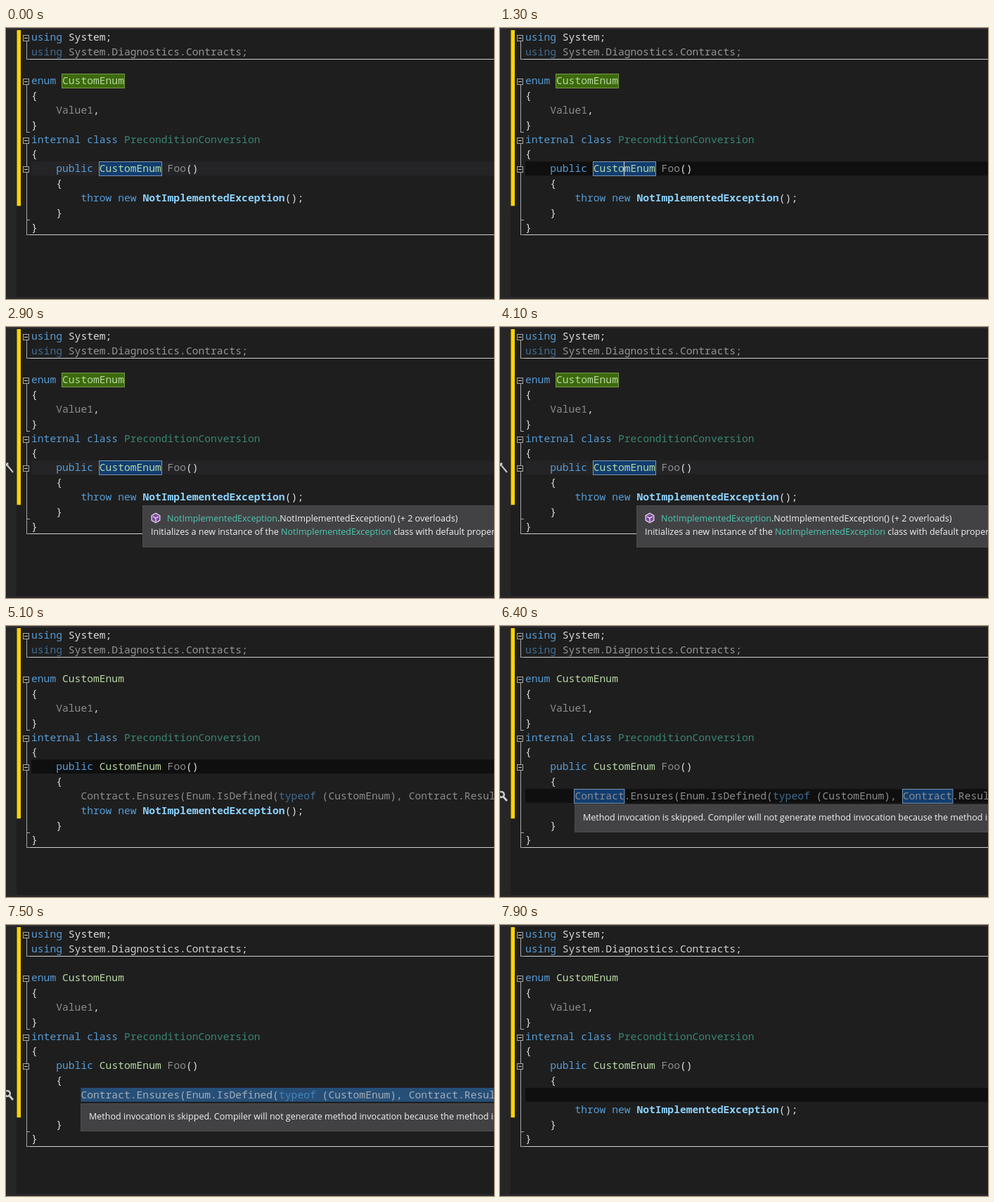
These frames come from a looping animation (694 px wide and 386 px high, 8 s). An HTML page with a canvas:

```html
<!DOCTYPE html>
<html lang="en">
<head>
<meta charset="utf-8">
<title>Code editor</title>
<style>
html, body { margin: 0; width: 100%; height: 100%; overflow: hidden; background: #1e1e1e; }
canvas { display: block; width: 694px; height: 386px; }
</style>
</head>
<body>
<canvas id="stage" width="694" height="386"></canvas>
<script>
const W = 694, H = 386, LOOP = 8000;
const ctx = document.getElementById('stage').getContext('2d');

const LEFT = 36, TOP = 2.8, PITCH = 20.83, CHAR = 8.8;
const CODE = '14.667px "Noto Sans Mono", "DejaVu Sans Mono", monospace';
const TIP = '12.55px "Open Sans", "Noto Sans", sans-serif';

const C = {
  bg: '#1e1e1e', plain: '#dcdcdc', key: '#569cd6', dimKey: '#416c91',
  gray: '#8c8c8c', type: '#b8d7a3', cls: '#3a8573', call: '#8cd2fc',
  fold: '#a8a8a8', rule: '#cfcfcf', yellow: '#fbd304', tip: '#424245',
  tipEdge: '#4b4b4e', tipText: '#f1f1f1', tipType: '#4ec9b0'
};

const rowY = row => TOP + row * PITCH;
const colX = col => LEFT + col * CHAR;
const within = (t, from, to) => t >= from && t < to;

function fill(x, y, w, h, color) {
  ctx.fillStyle = color;
  ctx.fillRect(x, y, w, h);
}

// Runs are [text, color, bold] triples laid out on the character grid.
function codeLine(row, col, ...runs) {
  for (const [text, color, bold] of runs) {
    ctx.font = (bold ? 'bold ' : '') + CODE;
    ctx.fillStyle = color;
    ctx.fillText(text, colX(col), rowY(row) + 15);
    col += text.length;
  }
}

function tipLine(x, y, ...runs) {
  ctx.font = TIP;
  for (const [text, color] of runs) {
    ctx.fillStyle = color;
    ctx.fillText(text, x, y);
    x += ctx.measureText(text).width;
  }
}

function mark(row, col, len, color, edge) {
  const x = Math.round(colX(col)) - 0.5, y = Math.round(rowY(row)) + 0.5;
  ctx.fillStyle = color;
  ctx.strokeStyle = edge;
  ctx.lineWidth = 1;
  ctx.fillRect(x, y, len * CHAR + 1, 20);
  ctx.strokeRect(x, y, len * CHAR + 1, 20);
}

const blueMark = (row, col, len) => mark(row, col, len, '#113d70', '#7c94ab');

function foldBox(row) {
  const y = Math.round(rowY(row) + 10.9);
  fill(24, y - 4, 9, 9, C.fold);
  fill(25, y - 3, 7, 7, C.bg);
  fill(26, y, 5, 1, '#d0d0d0');
}

function foldSpan(top, bottom) {
  const y = Math.round(rowY(bottom + 1) - 0.4);
  const start = Math.round(rowY(top) + 15.6);
  fill(29, start, 1, y - start, C.fold);
  fill(29, y, 5, 1, C.fold);
  return y;
}

function gutter(extra) {
  fill(15.5, 3, 5.5, rowY(12 + extra) - 2.4, C.yellow);
  const rule = y => fill(34, y, W - 34, 1, C.rule);
  rule(foldSpan(0, 1));
  foldSpan(3, 6);
  foldSpan(9, 12 + extra);
  rule(foldSpan(7, 13 + extra));
  [0, 3, 7, 9].forEach(foldBox);
}

function stroke(width, color, ...points) {
  ctx.lineWidth = width;
  ctx.strokeStyle = color;
  ctx.beginPath();
  points.forEach(([x, y]) => ctx.lineTo(x, y));
  ctx.stroke();
}

function hammer(y) {
  stroke(3, '#c8c8c8', [-1, y - 3], [3, y - 6]);
  stroke(2, '#c8c8c8', [1, y - 4], [10, y + 7]);
}

function wrench(y) {
  ctx.lineWidth = 2.5;
  ctx.strokeStyle = '#cfcfcf';
  ctx.beginPath();
  ctx.arc(2, y - 2, 3.8, -2, 2.6);
  ctx.stroke();
  stroke(2.8, '#cfcfcf', [4.5, y + 1], [10, y + 7]);
}

function tipBox(x, h) {
  fill(x, 254, W - x, h, C.tipEdge);
  fill(x + 1, 255, W - x, h - 2, C.tip);
}

function exceptionTip() {
  tipBox(194, 60);
  const hex = (r, color) => {
    ctx.fillStyle = color;
    ctx.beginPath();
    for (let i = 0; i < 6; i++) {
      const a = Math.PI * (i / 3 + 0.5);
      ctx.lineTo(213 + r * Math.cos(a), 272 + r * Math.sin(a));
    }
    ctx.fill();
  };
  hex(7.5, '#e4d8ee');
  hex(6, '#7b4a9c');
  stroke(1.2, '#eee4f4', [209, 270], [213, 272.3], [217, 270]);
  stroke(1.2, '#eee4f4', [213, 272], [213, 277]);
  const name = 'NotImplementedException';
  tipLine(229, 277, [name, C.tipType], ['.' + name + '() (+ 2 overloads)', C.tipText]);
  tipLine(206, 295.5, ['Initializes a new instance of the ', C.tipText], [name, C.tipType],
    [' class with default properties.', C.tipText]);
}

function skippedTip() {
  tipBox(106, 40);
  tipLine(118, 276.5, ['Method invocation is skipped. Compiler will not generate method ' +
    'invocation because the method is conditional', C.tipText]);
}

function contractLine(selected) {
  const text = selected ? '#a4adb6' : C.gray;
  codeLine(11, 8, ['Contract.Ensures(Enum.IsDefined(', text],
    ['typeof', selected ? '#4485ba' : C.dimKey],
    [' (CustomEnum), Contract.Result<CustomEnum>()));', text]);
}

function draw(t) {
  const inserted = t >= 4300, extra = inserted ? 1 : 0;
  const selected = within(t, 6600, 7900), deleted = t >= 7900;
  const usingLit = t >= 7300;
  const row = t < 5500 ? 9 : 11;
  const focused = within(t, 1300, 2400) || inserted;

  fill(0, 0, W, H, C.bg);
  fill(0, 0, 15, H, '#262627');
  fill(0, 0, W, 2, '#323236');
  fill(0, 383, W, 3, '#29292b');

  if (!selected) fill(LEFT, rowY(row), W, PITCH - 1, focused ? '#0f0f0f' : '#242426');
  gutter(extra);

  if (!inserted) {
    mark(3, 5, 10, '#3c6a0b', '#759a48');
    blueMark(9, 11, 10);
  }
  if (selected) fill(colX(8), rowY(11), W, PITCH - 1, '#264f78');
  if (within(t, 5700, 6600)) [8, 61].forEach(col => blueMark(11, col, 8));

  codeLine(0, 0, ['using', C.key], [' System;', C.plain]);
  codeLine(1, 0, ['using', usingLit ? C.key : C.dimKey],
    [' System.Diagnostics.Contracts;', usingLit ? '#d0d0d0' : '#959595']);
  codeLine(3, 0, ['enum ', C.key], ['CustomEnum', C.type]);
  codeLine(4, 0, ['{', C.plain]);
  codeLine(5, 4, ['Value1', C.gray], [',', C.plain]);
  codeLine(6, 0, ['}', C.plain]);
  codeLine(7, 0, ['internal class ', C.key], ['PreconditionConversion', C.cls]);
  codeLine(8, 0, ['{', C.plain]);
  codeLine(9, 4, ['public ', C.key], ['CustomEnum ', C.type], ['Foo', C.gray], ['()', C.plain]);
  codeLine(10, 4, ['{', C.plain]);
  if (inserted && !deleted) contractLine(selected);
  codeLine(11 + extra, 8, ['throw new ', C.key],
    ['NotImplementedException', C.call, true], ['();', C.plain]);
  codeLine(12 + extra, 4, ['}', C.plain]);
  codeLine(13 + extra, 0, ['}', C.plain]);

  if (within(t, 1300, 2400)) fill(176, rowY(9), 1, PITCH - 1, C.plain);
  if (within(t, 5500, 6000) || within(t, 6600, 7200)) fill(106, rowY(11), 1, PITCH - 1, C.plain);

  if (within(t, 1800, 5000)) hammer(200);
  if (within(t, 1800, 4300)) exceptionTip();
  if (within(t, 5900, 6600) || within(t, 7300, 7900)) {
    wrench(242);
    skippedTip();
  }
}

function tick(now) {
  draw(now % LOOP);
  requestAnimationFrame(tick);
}
draw(0);
requestAnimationFrame(tick);
</script>
</body>
</html>
```
